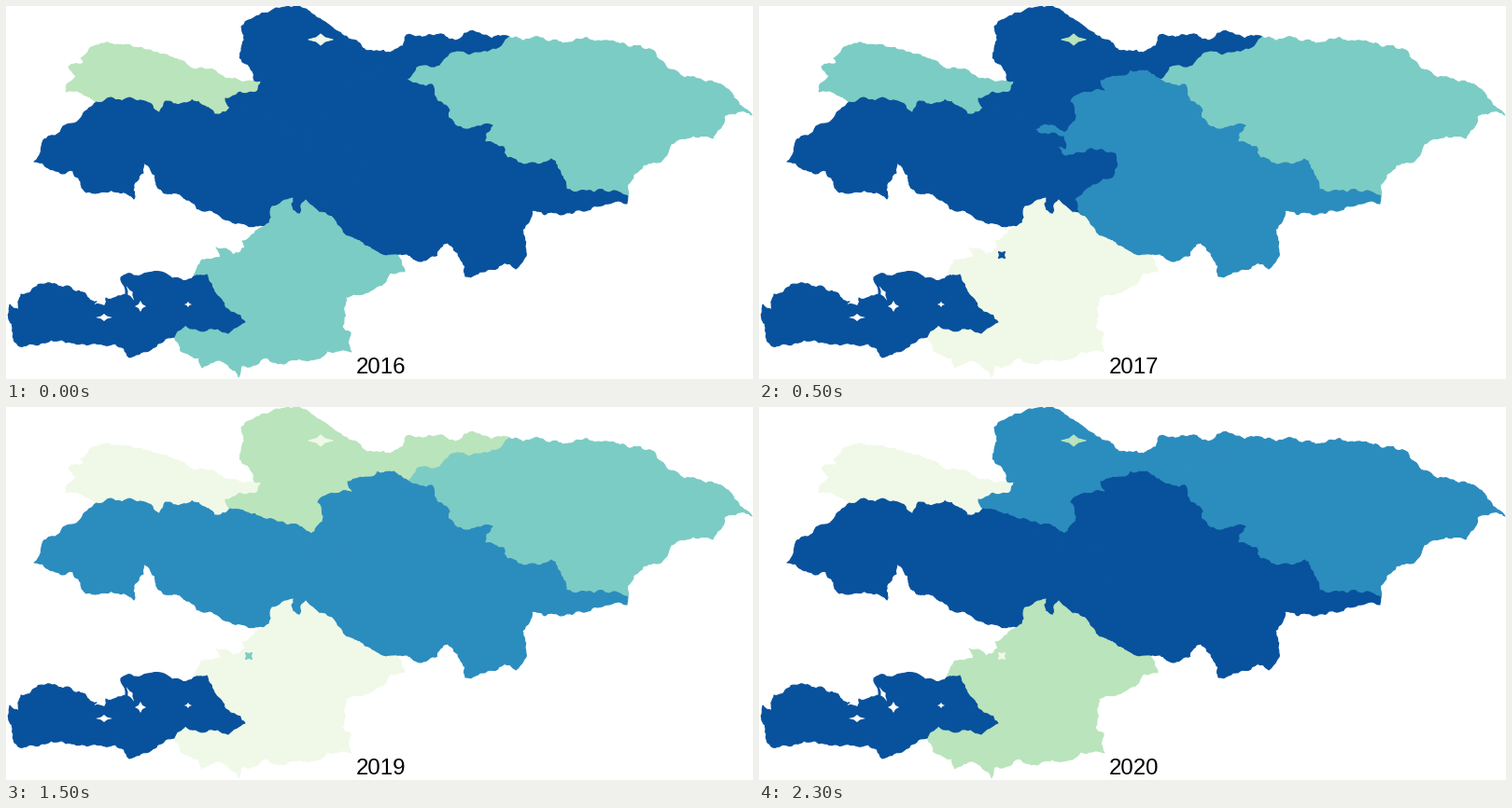
A matplotlib script that plays this animation: 800x400 px, repeating every 2500 ms.

```python
import math
import random

import matplotlib.pyplot as plt
from matplotlib.animation import FuncAnimation
from matplotlib.patches import Polygon

W, H, DPI = 800, 400, 100
FIRST_YEAR = 2016
PALETTE = ["#f0f9e8", "#bae4bc", "#7bccc4", "#2b8cbe", "#08519c"]

# Points where borders meet (pixels, y down)
NODES = {
    "p": (266, 80), "w": (97, 103), "q": (240, 109), "e": (539, 33),
    "c": (430, 79), "m": (313, 127), "r": (666, 204), "s": (419, 267),
    "o": (342, 222), "j": (277, 236), "b": (201, 290), "d": (180, 355),
    "k": (4, 338),
}

# Key points of the border between two nodes
BORDERS = {
    "pw": [(225, 70), (187, 58), (157, 49), (125, 42), (90, 45), (80, 56),
           (83, 61), (67, 65), (75, 75), (64, 92)],
    "wq": [(124, 102), (165, 115), (171, 102), (223, 116)],
    "qp": [(235, 99), (268, 92), (275, 79)],
    "pe": [(253, 60), (252, 22), (299, 1), (347, 21), (370, 36), (425, 43),
           (429, 31), (481, 37), (503, 28)],
    "ec": [(533, 40), (483, 49), (466, 62), (440, 66)],
    "cm": [(366, 80), (371, 92), (334, 102), (339, 123), (327, 136)],
    "mq": [(290, 123), (258, 113)],
    "er": [(570, 33), (605, 39), (640, 37), (692, 47), (727, 77), (757, 81),
           (783, 101), (799, 117), (769, 119), (757, 142), (736, 139),
           (697, 168), (672, 181)],
    "cr": [(456, 84), (475, 112), (474, 120), (521, 128), (513, 146),
           (533, 151), (537, 163), (584, 164), (600, 196), (630, 200)],
    "rs": [(665, 212), (620, 220), (563, 219), (553, 240), (556, 258),
           (546, 282), (533, 276), (492, 290), (486, 270), (473, 254),
           (445, 274)],
    "so": [(396, 263), (372, 249)],
    "mo": [(295, 132), (315, 136), (326, 140), (328, 153), (313, 148),
           (328, 161), (382, 159), (380, 181), (357, 191), (338, 208)],
    "oj": [(321, 208), (315, 223), (307, 219), (307, 206), (285, 215)],
    "jw": [(258, 235), (234, 229), (197, 209), (170, 201), (155, 176),
           (148, 167), (147, 179), (140, 188), (137, 207), (86, 200),
           (72, 177), (60, 180), (30, 167), (61, 129), (82, 117)],
    "jb": [(253, 252), (256, 259), (243, 267), (225, 259), (229, 270),
           (210, 272)],
    "bd": [(215, 288), (231, 315), (256, 339), (238, 351), (192, 342)],
    "ds": [(187, 370), (207, 377), (210, 388), (229, 380), (249, 398),
           (252, 386), (275, 378), (320, 380), (370, 371), (369, 350),
           (360, 344), (363, 312), (388, 307), (412, 286), (427, 285)],
    "bk": [(178, 292), (134, 287), (123, 291), (128, 309), (107, 313),
           (106, 321), (92, 322), (97, 317), (66, 300), (47, 297),
           (16, 309), (14, 326), (4, 320)],
    "kd": [(13, 364), (48, 358), (92, 362), (117, 362), (132, 377),
           (153, 370)],
}

# Ring of nodes, then the palette index for each year
REGIONS = {
    "pwq": "12200", "pecmq": "44113", "erc": "22223", "crsom": "43434",
    "mojwq": "44434", "jbdso": "20001", "bkd": "44444",
}


def ragged(a, b, rng):
    """Points from a up to b, shaken at every halving of the line."""
    dx, dy = b[0] - a[0], b[1] - a[1]
    if math.hypot(dx, dy) < 3.5:
        return [a]
    shift = rng.uniform(-0.17, 0.17)
    mid = ((a[0] + b[0]) / 2 - shift * dy, (a[1] + b[1]) / 2 + shift * dx)
    return ragged(a, mid, rng) + ragged(mid, b, rng)


def border(ends, rng):
    points = [NODES[ends[0]], *BORDERS[ends], NODES[ends[1]]]
    line = [p for a, b in zip(points, points[1:]) for p in ragged(a, b, rng)]
    return line + points[-1:]


def outline(ring, lines):
    points = []
    for a, b in zip(ring, ring[1:] + ring[0]):
        points += lines[a + b] if a + b in lines else lines[b + a][::-1]
    return points


def star(cx, cy, rx, ry, tilt=0):
    """Small four-pointed patch."""
    c, s = math.cos(math.radians(tilt)), math.sin(math.radians(tilt))
    points = []
    for k in range(8):
        r = 0.5 if k % 2 else 1
        x = rx * r * math.cos(k * math.pi / 4)
        y = ry * r * math.sin(k * math.pi / 4)
        points.append((cx + c * x - s * y, cy + s * x + c * y))
    return points


rng = random.Random(7)
lines = {ends: border(ends, rng) for ends in BORDERS}

fig = plt.figure(figsize=(W / DPI, H / DPI), dpi=DPI, facecolor="white")
ax = fig.add_axes([0, 0, 1, 1])
ax.set_xlim(0, W)
ax.set_ylim(H, 0)
ax.axis("off")

areas = []


def add_area(points, levels):
    # The thin edge closes the seam between neighbours of one colour
    patch = ax.add_patch(Polygon(points, lw=0.75, joinstyle="round"))
    areas.append((patch, levels))


for ring, levels in REGIONS.items():
    add_area(outline(ring, lines), levels)
add_area(star(337, 36, 13, 6), "01101")
add_area(star(260, 267, 5, 5, 45), "24420")

for hole in [(105, 334, 9, 4), (133, 308, 9, 3, 62), (144, 322, 6, 6),
             (195, 320, 4, 3)]:
    ax.add_patch(Polygon(star(*hole), fc="white", lw=0))

label = ax.text(401, 394, "", ha="center", va="baseline", color="black",
                family="Liberation Sans", fontsize=24 * 72 / DPI)


def draw(i):
    for patch, levels in areas:
        patch.set_color(PALETTE[int(levels[i])])
    label.set_text(str(FIRST_YEAR + i))
    return [patch for patch, _ in areas] + [label]


anim = FuncAnimation(fig, draw, frames=5, interval=500,
                     repeat=True, repeat_delay=0)
plt.show()
```
